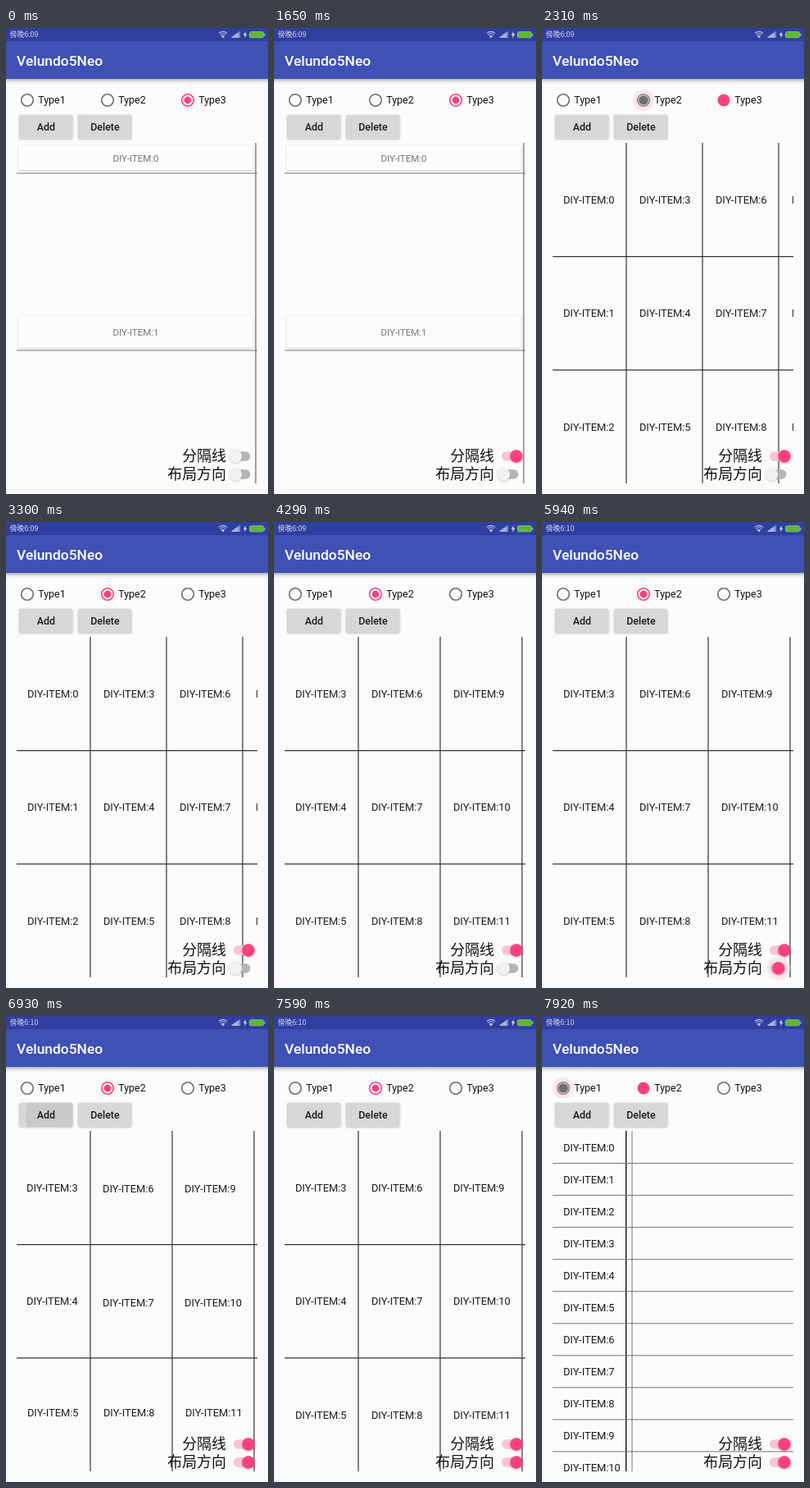
An HTML page that plays this animation: 320x568 px, repeating every 8000 ms.

```html
<!DOCTYPE html>
<html lang="zh-CN">
<head>
<meta charset="utf-8">
<title>List layouts</title>
<style>
  html, body { margin: 0; width: 100%; height: 100%; overflow: hidden; background: #fafbfa; }
  svg { display: block; width: 100vw; height: 100vh; }
  text { font-family: Roboto, sans-serif; white-space: pre; }
  .cjk { font-family: "Noto Sans CJK SC", "Noto Sans CJK", sans-serif; }
</style>
</head>
<body>
<svg viewBox="0 0 320 568">
  <defs>
    <clipPath id="listClip"><rect x="13" y="140" width="294" height="415"/></clipPath>
    <clipPath id="addClip"><rect x="16" y="105.7" width="65.5" height="29.3" rx="2"/></clipPath>
    <linearGradient id="barShade" x2="0" y2="1">
      <stop stop-color="#000" stop-opacity=".3"/>
      <stop offset=".5" stop-color="#000" stop-opacity=".08"/>
      <stop offset="1" stop-color="#000" stop-opacity="0"/>
    </linearGradient>
    <filter id="lift" x="-30%" y="-30%" width="160%" height="160%">
      <feDropShadow dx="0" dy=".7" stdDeviation=".9" flood-opacity=".28"/>
    </filter>
  </defs>
  <rect width="320" height="568" fill="#fafbfa"/>
  <rect y="62" width="320" height="7" fill="url(#barShade)"/>
  <rect y="16" width="320" height="46" fill="#3f51b5"/>
  <rect width="320" height="16" fill="#303f9f"/>
  <text x="13" y="46" font-size="17.4" font-weight="500" fill="#fff">Velundo5Neo</text>
  <g fill="#b9c0e6">
    <path d="M265 12.5L262.6 9.7Q265 7.8 267.4 9.7Z"/>
    <path d="M261.3 8.2Q265 5.2 268.7 8.2M259.8 6.4Q265 2.4 270.2 6.4" fill="none" stroke="#b9c0e6" stroke-width="1.1"/>
    <path d="M275.8 12v-2h1.9v2zM278 12v-3.5h1.9V12zM280.2 12V7h1.9v5zM282.4 12V5.5h1.9V12z"/>
    <path d="M284.6 12V4h1.5v8z" opacity=".6"/>
    <path d="M292.8 4l-3 4.6h2l-.8 3.8 3.2-5h-2z" fill="#e8ebfa"/>
  </g>
  <rect x="297.4" y="4.6" width="17.2" height="7.2" rx="2" fill="#5cb82e" stroke="#8fbf8a" stroke-width=".8"/>
  <rect x="315.2" y="6.8" width="1.3" height="3" fill="#8fbf8a"/>
  <g id="scene"></g>
</svg>
<script>
const LOOP = 8000, TICK = 330;
const PINK = '#ff4081', GREY = '#6e6e6e', INK = '#333';
const HALO = '#fbe6ec';
const scene = document.getElementById('scene');

// When things are pressed, in ms
const picks = [{ at: -1000, type: 3 }, { at: 2200, type: 2 }, { at: 7810, type: 1 }];
const toggles = [{ y: 522, at: 1200, label: '分隔线' }, { y: 544, at: 5810, label: '布局方向' }];
const moves = [{ at: 4768, by: 1 }, { at: 6696, by: -2 }];
const SCROLL_AT = 3400, ADD_AT = 6845, MINUTE_AT = 5900;

const clamp = v => Math.max(0, Math.min(1, v));
const ease = (t, at, ms = 250) => (1 - Math.cos(Math.PI * clamp((t - at) / ms))) / 2;
const mix = (a, b, p) => a + (b - a) * p;

const text = (x, y, s, size, attrs = '') =>
  `<text x="${x}" y="${y}" font-size="${size}" ${attrs}>${s}</text>`;
const line = (x1, y1, x2, y2, color, w = 1) =>
  `<path d="M${x1} ${y1}L${x2} ${y2}" stroke="${color}" stroke-width="${w}"/>`;
const disc = (x, y, r, fill, attrs = '') =>
  `<circle cx="${x}" cy="${y}" r="${r}" fill="${fill}" ${attrs}/>`;
const box = (x, y, w, h, r, fill, attrs = '') =>
  `<rect x="${x}" y="${y}" width="${w}" height="${h}" rx="${r}" fill="${fill}" ${attrs}/>`;
const item = (x, y, n) =>
  text(x.toFixed(2), (y + 4.6).toFixed(2), 'DIY-ITEM:' + n, 12.9, 'fill="#1c1c1c"');

function radio(type, t, pick, last) {
  const x = 26 + (type - 1) * 98, y = 88;
  const changing = t - pick.at < 200;
  const on = type === pick.type;
  const ring = color => disc(x, y, 7.3, 'none', `stroke="${color}" stroke-width="1.6"`);
  let mark;
  if (changing && on) mark = disc(x, y, 13, HALO) + ring('#8c8588') + disc(x, y, 5.8, GREY);
  else if (changing && type === last.type) mark = disc(x, y, 7.5, PINK);
  else if (on) mark = ring(PINK) + disc(x, y, 4.4, PINK);
  else mark = ring(GREY);
  return mark + text(x + 13.2, 92.4, 'Type' + type, 12.44, 'fill="#111"');
}

function buttons(t) {
  const face = x => box(x, 105.7, 65.5, 29.3, 2, '#d6d7d6', 'filter="url(#lift)"');
  const label = (x, s) => text(x, 125.1, s, 12.44, 'font-weight="500" text-anchor="middle" fill="#1c1c1c"');
  const age = t - ADD_AT;
  const ripple = age > 0 && age < 300
    ? `<g clip-path="url(#addClip)">${disc(75, 121, age * .6, '#c8cac7')}</g>` : '';
  return face(16) + face(88) + ripple + label(48.9, 'Add') + label(120.9, 'Delete');
}

function toggle({ y, at, label }, t) {
  const p = ease(t, at), on = t >= at;
  const age = t - at;
  const x = mix(280.5, 296, p);
  return text(268.9, y + 5.8, label, 17.9, 'class="cjk" text-anchor="end" fill="#111"') +
    (age > 0 && age < 400 ? disc(x, y, 14, HALO) : '') +
    box(278, y - 5.8, 20.5, 11.6, 5.8, on ? '#ffc2d6' : '#b5b5b5') +
    disc(x, y, 7.7, on ? PINK : '#f1f1f1', 'filter="url(#lift)"');
}

function cards() {
  const card = (y, h, n) => box(15.5, y, 286, h, 2, '#fbfdfb', 'filter="url(#lift)"') +
    text(158.5, y + h / 2 + 4.3, 'DIY-ITEM:' + n, 11.5, 'text-anchor="middle" fill="#757575"');
  return card(143.5, 29.5, 0) + card(351, 38.5, 1) +
    line(13, 177, 307, 177, '#777') + line(13, 393, 307, 393, '#777') +
    line(305, 140, 305, 555, '#666', 1.2);
}

function grid(t) {
  const p = ease(t, SCROLL_AT, 220);
  const first = p < .5 ? 0 : 1;
  // Column edges before and after the sideways scroll
  const edges = [10, 103, 196, 289, 389];
  const ends = [-83, 10, 103, 203, 303];
  let out = '';
  edges.forEach((e, c) => {
    const x = mix(e, ends[c], p);
    if (x > 13 && x < 307) out += line(x, 140, x, 555, INK, 1.2);
    for (let r = 0; r < 3; r++) {
      let dx = 0, dy = 0;
      for (const { at, by } of moves) {
        if (t < at) continue;
        const rest = 1 - ease(t, at);
        const slot = r + by, cols = Math.floor(slot / 3);
        dx += cols * 93 * rest;
        if (cols >= 0 || c > first) dy += (slot - cols * 3 - r) * 138.3 * rest;
      }
      out += item(x + 15.9 + dx, 209.5 + r * 138.3 + dy, c * 3 + r);
    }
  });
  return out + line(13, 278.7, 307, 278.7, INK, 1.2) + line(13, 416.8, 307, 416.8, INK, 1.2);
}

function rows() {
  let out = line(102.7, 140, 102.7, 555, '#111', 1.4) + line(110, 140, 110, 555, '#777');
  for (let i = 0; i < 11; i++) {
    const y = 140 + i * 39.05;
    out += item(25.9, y + 20, i) + line(13, y + 39.5, 307, y + 39.5, '#777');
  }
  return out;
}

function draw(t) {
  const i = picks.findLastIndex(k => t >= k.at);
  const pick = picks[i], last = picks[i - 1] || pick;
  const list = { 1: rows, 2: grid, 3: cards }[pick.type](t);
  scene.innerHTML =
    text(4.6, 11.4, '傍晚6:' + (t < MINUTE_AT ? '09' : '10'), 8.8, 'class="cjk" fill="#d5d9f0"') +
    [1, 2, 3].map(n => radio(n, t, pick, last)).join('') +
    buttons(t) +
    `<g clip-path="url(#listClip)">${list}</g>` +
    toggles.map(s => toggle(s, t)).join('');
}

// The screen refreshes in slow, even ticks
let shown = -1;
function step() {
  const t = Math.floor(performance.now() % LOOP / TICK) * TICK;
  if (t !== shown) draw(shown = t);
  requestAnimationFrame(step);
}
step();
</script>
</body>
</html>
```
